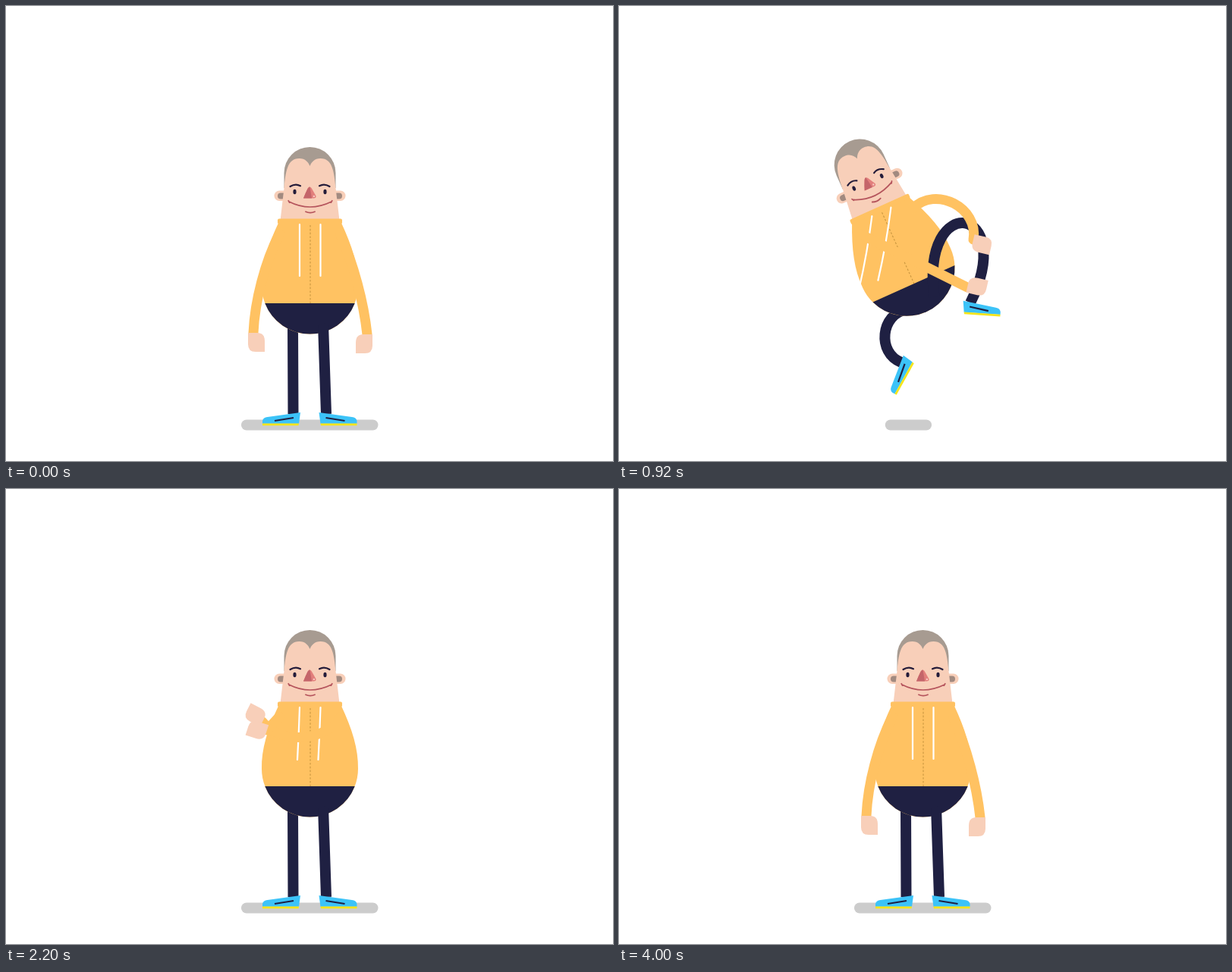
Animation of 800 by 600 pixels, one loop 4.04 s. Source, as an HTML page with a canvas:

```html
<!DOCTYPE html>
<html lang="en">
<head>
<meta charset="utf-8">
<title>Air guitar</title>
<style>
html, body { margin: 0; width: 100%; height: 100%; overflow: hidden; background: #fff; }
canvas { display: block; width: 800px; height: 600px; }
</style>
</head>
<body>
<canvas id="stage" width="800" height="600"></canvas>
<script>
const ctx = document.getElementById('stage').getContext('2d');
const LOOP = 4040, STEP = 40, GROUND = 538;
const C = {
  skin: '#f8cfb9', hair: '#a79b91', ear: '#a18a80', shirt: '#ffc262', pants: '#1f2042',
  shoe: '#3cc3f8', sole: '#f5e51b', lip: '#b5545c', nose: '#e27f7c', noseDark: '#c4656a',
  zip: '#c9963f', shadow: '#cccccc', ink: '#241c3a'
};

// Body, hands and feet: x, y, turn in degrees. The left hand adds an elbow bend.
// Cord: how far its end hangs from the collar.
const stand = {
  body: [400.5, 369, 0],
  handR: [476, 433, 0],
  handL: [326, 431, 0, -9],
  footR: [422, GROUND, 0],
  footL: [378.5, GROUND, 0],
  cord: [0, 68]
};
const pose = changes => Object.values({ ...stand, ...changes }).flat();
const poses = {
  stand: pose({}),
  lift: pose({
    body: [389.3, 381, -12], handR: [487, 373, -47], handL: [443, 421, -44, -5],
    footR: [460, 471, 17], cord: [-4, 62]
  }),
  jump: pose({
    body: [379, 345.3, -24.3], handR: [467, 308, -77], handL: [459, 371, -77, 0],
    footR: [463, 391.5, 4], footL: [372, 470, -61], cord: [-17, 96]
  }),
  strum: pose({
    body: [371, 393.3, -35.5], handR: [475, 360, -100], handL: [458, 422, -77, 0],
    footR: [462, 440, 12], cord: [43, 15]
  }),
  cheer: pose({ handR: [338, 307, 117], handL: [344, 318, 108, 0], cord: [-3, 69] }),
  lean: pose({
    body: [416, 384.5, 17.3], handR: [357, 287, 121], handL: [357, 308, 180, 56], cord: [2, 70]
  })
};

// Time, pose, and how far from standing towards it (over 1 overshoots).
const keys = [
  [0, 'stand'], [320, 'lift'], [600, 'strum', 1.13], [720, 'strum', .85], [920, 'jump'],
  [1200, 'strum', .95], [1400, 'strum'], [1540, 'strum', .95], [1680, 'lift', .9],
  [2080, 'cheer', 1.12], [2200, 'cheer'], [2320, 'cheer'], [2760, 'lean', 1.13],
  [3040, 'lean'], [3420, 'cheer', .5], [3760, 'stand'], [LOOP, 'stand']
].map(([t, name, amount = 1]) => ({
  t, v: poses[name].map((p, i) => poses.stand[i] + (p - poses.stand[i]) * amount)
}));

// Smooth curve through the keys that adds no overshoot of its own.
function poseAt(t) {
  const i = keys.findIndex(k => k.t > t) - 1;
  const a = keys[i], b = keys[i + 1], h = b.t - a.t, u = (t - a.t) / h;
  const slope = (k, c) => k < 0 || k > keys.length - 2 ? 0
    : (keys[k + 1].v[c] - keys[k].v[c]) / (keys[k + 1].t - keys[k].t);
  const tangent = (k, c) => {
    const p = slope(k - 1, c), q = slope(k, c);
    return p * q > 0 ? 2 * p * q / (p + q) : 0;
  };
  return a.v.map((v, c) => v + (b.v[c] - v) * u * u * (3 - 2 * u)
    + h * u * (1 - u) * ((1 - u) * tangent(i, c) - u * tangent(i + 1, c)));
}

const rad = d => d * Math.PI / 180;
const slack = (length, d) => Math.max(0, length - d);
function fill(d, color) {
  ctx.fillStyle = color;
  ctx.fill(new Path2D(d));
}
function line(d, color, width, cap = 'butt') {
  ctx.strokeStyle = color;
  ctx.lineWidth = width;
  ctx.lineCap = cap;
  ctx.stroke(new Path2D(d));
}
function box(x, y, w, h, r, color) {
  ctx.fillStyle = color;
  ctx.beginPath();
  ctx.roundRect(x, y, w, h, r);
  ctx.fill();
}
function place(x, y, deg, side, draw) {
  ctx.save();
  ctx.translate(x, y);
  ctx.rotate(rad(deg));
  ctx.scale(side, 1);
  draw();
  ctx.restore();
}
const mirror = draw => place(0, 0, 0, -1, draw);
function onBody([x, y, deg], px, py) {
  const c = Math.cos(rad(deg)), s = Math.sin(rad(deg));
  return [x + px * c - py * s, y + px * s + py * c];
}

// Bendy limb: the handles move off the straight line by the bend and spread apart with it.
function limb([ax, ay], [bx, by, turn], bendFor, style, side, tip) {
  const d = Math.hypot(bx - ax, by - ay) || 1;
  const ux = (bx - ax) / d, uy = (by - ay) / d;
  const bend = bendFor(d), along = d / 3 - .42 * Math.abs(bend);
  const ox = uy * bend, oy = -ux * bend;
  line(`M${ax} ${ay}C${[
    ax + ox + ux * along, ay + oy + uy * along,
    bx + ox - ux * along, by + oy - uy * along, bx, by
  ]}`, ...style);
  place(bx, by, turn, side, tip);
}

function shoe() {
  fill('M9.5-2L7.5 12.7H-40.5V9Q-39.5 4.5-34 4Z', C.shoe);
  fill('M-40.5 12.5H7.5L7 15.3H-40.5Z', C.sole);
  line('M-24.5 9L.5 5', C.pants, 2.2);
}
function hand() {
  fill('M-7 0H5Q15 0 15 11V25H3Q-7 25-7 15Z', C.skin);
}
function ear() {
  box(-47, -125.5, 20, 13.5, 6.7, C.skin);
  box(-42.5, -122.5, 12, 8, 4, C.ear);
}
function eye() {
  ctx.fillStyle = C.ink;
  ctx.beginPath();
  ctx.ellipse(-20, -124, 2.1, 3.2, 0, 0, 7);
  ctx.fill();
  line('M-26-131Q-19-135.5-12.5-131.8', C.ink, 2.2, 'round');
}
function head() {
  ear();
  mirror(ear);
  fill('M-34-129V-149A34 34 0 0 1 34-149V-129Z', C.hair);
  fill('M-34-129C-32-150-30-168-14-168C-6-168-2-163 0-158C2-163 6-168 14-168' +
    'C30-168 32-150 34-129L39-86H-39Z', C.skin);
  eye();
  mirror(eye);
  fill('M0-130.5Q2-130 3.5-126.5L8-118.5Q8.5-115.5 5-115.5H-8.5Q-6-122-3.5-127Q-2-130.5 0-130.5Z', C.nose);
  fill('M0-130.5L2.5-115.5H-8.5Q-6-122-3.5-127Q-2-130.5 0-130.5Z', C.noseDark);
  box(4.2, -119.3, 2.4, 2.4, 1.2, '#f9c9c4');
  line('M-27.5-111Q0-97 28.5-111M-28.3-112.3L-26.8-109.8M29.3-112.3L27.8-109.8', C.lip, 1.7, 'round');
  line('M-5.5-97.7Q.5-95 6.5-97.7', C.lip, 1.8, 'round');
}
function torso() {
  fill('M-41-84C-56-52-64-26-63.5 0A63.5 63.5 0 0 0 63.5 0C64-26 56-52 41-84Z', C.shirt);
  fill('M-59.2 23A63.5 63.5 0 0 0 59.2 23Z', C.pants);
  box(-42.5, -88.5, 85, 7, 2, C.shirt);
  ctx.setLineDash([2.6, 2.2]);
  line('M.5-80V23', C.zip, 1.1);
  ctx.setLineDash([]);
}
function hang([x, y], [ex, ey]) {
  const sag = ey / 2 + .9 * slack(68, Math.hypot(ex, ey));
  line(`M${x} ${y}q${[.35 * ex, sag, ex, ey]}`, '#fff', 2.2, 'round');
}

function draw(t) {
  const p = poseAt(t);
  const take = n => p.splice(0, n);
  const body = take(3), handR = take(3), handL = take(4);
  const footR = take(3), footL = take(3), cord = take(2);
  const leg = [C.pants, 14, 'butt'], arm = [C.shirt, 13, 'round'];

  ctx.fillStyle = '#fff';
  ctx.fillRect(0, 0, 800, 600);

  // Each lifted foot shortens its end of the shadow.
  const left = 310 + .6 * slack(GROUND, footL[1]);
  const right = 490.5 - .12 * slack(GROUND, footR[1]) ** 1.3;
  box(left, 545.5, right - left, 14, 7, C.shadow);

  limb(onBody(body, -22.5, 50), footL, d => -.7 * slack(118, d), leg, 1, shoe);
  place(...body, 1, () => { head(); torso(); });
  for (const x of [-13.5, 14]) hang(onBody(body, x, -81), cord);
  limb(onBody(body, 17.5, 50), footR, d => .028 * slack(118, d) ** 2, leg, -1, shoe);
  limb(onBody(body, 40, -68), handR, d => .72 * slack(146, d), arm, -1, hand);
  limb(onBody(body, -40, -69), handL, () => handL[3], arm, 1, hand);
}

const start = performance.now();
function tick() {
  const t = (performance.now() - start) % LOOP;
  draw(Math.floor(t / STEP) * STEP);
  requestAnimationFrame(tick);
}
tick();
</script>
</body>
</html>
```
